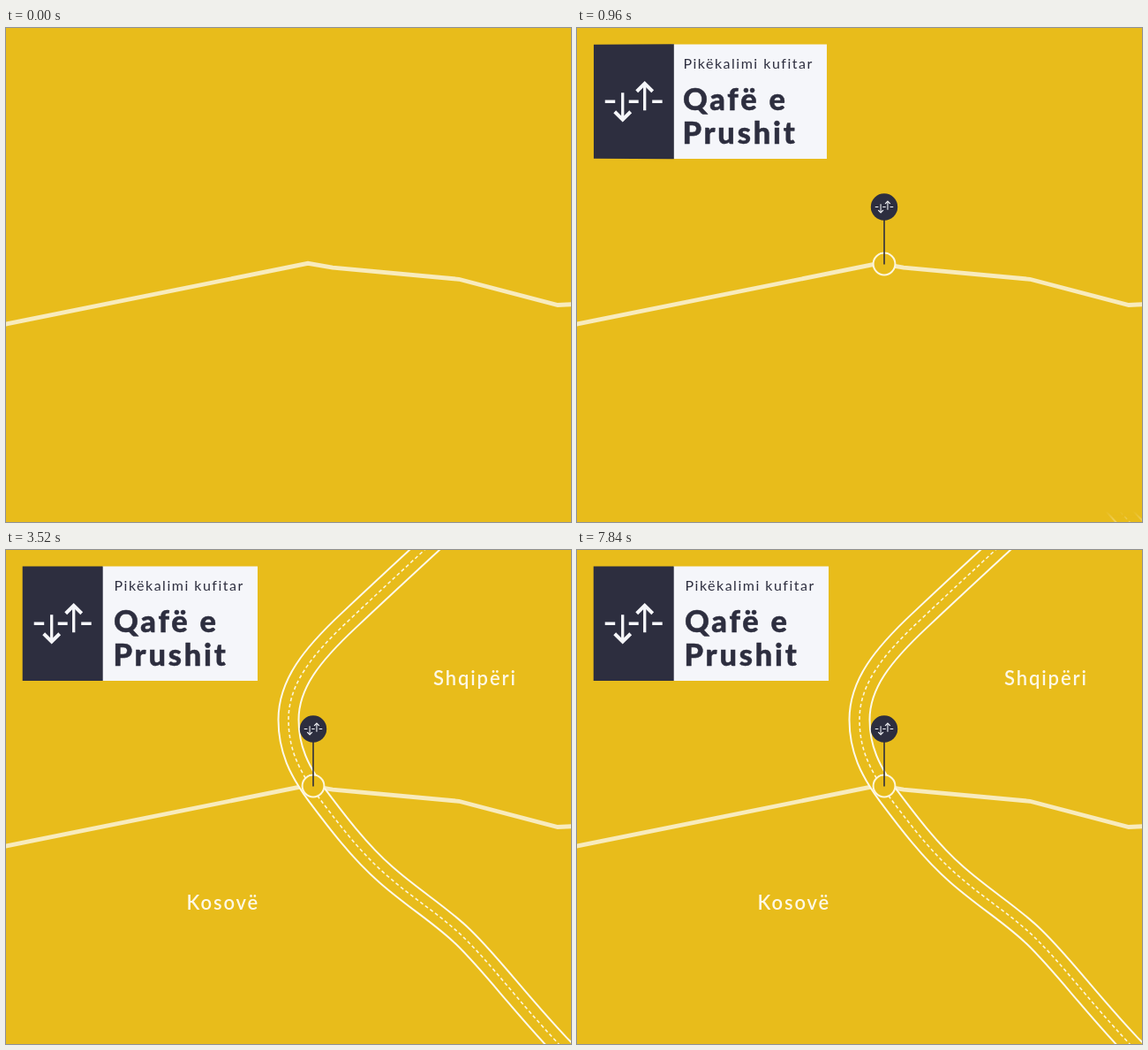
An HTML page for the animation above (8 s loop, 640x559 px).

```html
<!DOCTYPE html>
<html lang="sq">
<head>
<meta charset="utf-8">
<title>Pikëkalimi kufitar</title>
<style>
  html, body { margin: 0; width: 100%; height: 100%; overflow: hidden; background: #e8bc1b; }
  svg { display: block; width: 100%; height: 100%; }
  text { font-family: Lato, "Open Sans", sans-serif; }
  .small { font-size: 16px; letter-spacing: 1.5px; fill: #2d2e3f; }
  .title { font-size: 34.4px; font-weight: 800; letter-spacing: 2.8px; fill: #2d2e3f; stroke: #2d2e3f; stroke-width: .5px; }
  .label { font-size: 22px; font-weight: 600; letter-spacing: 1.9px; fill: #fdf8e6; }
</style>
</head>
<body>
<svg viewBox="0 0 640 559">
  <defs>
    <!-- crossing symbol, centred on 0,0 -->
    <g id="icon" fill="none" stroke="#f5f6fa" stroke-width="3.3">
      <path d="M-32.5 0h11.5M-5.5 0h11M21 0h11.5M-12.5 -10V19M12.5 10V-19"/>
      <path stroke-width="4" d="M-21.5 11.5l9 9l9 -9M3.5 -11.5l9 -9l9 9"/>
    </g>
    <path id="road" d="M487 -12C450 22 423 47 389 79C346 119 320 152 320 192C320 225 332 250 352 277C373 305 400 341 430 367C463 396 491 412 518 438C551 470 578 508 627 560l8 8"/>
    <linearGradient id="fade" gradientUnits="userSpaceOnUse" x1="0" x2="0" y1="559" y2="595">
      <stop offset="0" stop-color="#fff" stop-opacity="0"/>
      <stop offset="1" stop-color="#fff"/>
    </linearGradient>
    <mask id="wipe" maskUnits="userSpaceOnUse" x="0" y="0" width="640" height="559">
      <rect width="640" height="559" fill="url(#fade)"/>
    </mask>
    <clipPath id="right"><rect x="64" y="0" width="576" height="200"/></clipPath>
  </defs>

  <rect width="640" height="559" fill="#e8bc1b"/>
  <path d="M-5 336L342 266.3L370 271.2L513 284.3L625 313.5L645 312.5" fill="none" stroke="#f8ebbc" stroke-width="4.8"/>

  <g mask="url(#wipe)" fill="none">
    <use href="#road" stroke="#fdf9ea" stroke-width="25"/>
    <use href="#road" stroke="#e8bc1b" stroke-width="21"/>
    <use href="#road" stroke="#fdf6dc" stroke-width="1.6" stroke-dasharray="4 3"/>
  </g>

  <circle id="ring" cx="348" cy="267" r="12.4" fill="#e8bc1b" stroke="#fdf6dc" stroke-width="2"/>
  <path id="stem" stroke="#2d2e3f" stroke-width="1.6"/>
  <g id="pin" transform="translate(348 202.5)">
    <circle r="15.2" fill="#2d2e3f"/>
    <use href="#icon" transform="scale(.315)"/>
  </g>

  <g id="labels">
    <text class="label" x="484" y="152.5">Shqipëri</text>
    <text class="label" x="204.5" y="407">Kosovë</text>
  </g>

  <g clip-path="url(#right)">
    <g id="card">
      <rect x="109" y="18.5" width="176" height="129.5" fill="#f5f6fa"/>
      <text class="small" x="122.5" y="46.3">Pikëkalimi kufitar</text>
      <text class="title" x="122" y="92.5">Qafë e</text>
      <text class="title" x="121.5" y="131.3">Prushit</text>
    </g>
  </g>
  <g id="panel">
    <polygon id="face" fill="#2d2e3f"/>
    <use id="mark" href="#icon"/>
  </g>
</svg>
<script>
  const LOOP = 8000, STEP = 80;
  const el = id => document.getElementById(id);
  const set = (id, name, value) => el(id).setAttribute(name, value);

  const part = (t, from, to) => Math.min(1, Math.max(0, (t - from) / (to - from)));
  const easeOut = p => 1 - (1 - p) ** 2;
  const easeInOut = p => p < .5 ? 2 * p * p : 1 - 2 * (1 - p) ** 2;
  const easeSine = p => .5 - .5 * Math.cos(Math.PI * p);

  // Dark panel turning about its vertical centre line, in perspective
  function drawPanel(t) {
    const cx = 64.2, cy = 83.25, halfW = 45.5, halfH = 64.75, depth = 640;
    const angle = (1 - easeOut(part(t, 80, 1160))) * Math.PI / 2;
    const corner = (sx, sy) => {
      const zoom = depth / (depth - sx * halfW * Math.sin(angle));
      return [cx + sx * halfW * Math.cos(angle) * zoom, cy + sy * halfH * zoom];
    };
    set('face', 'points', [corner(-1, -1), corner(1, -1), corner(1, 1), corner(-1, 1)].join(' '));
    set('mark', 'transform', `translate(${cx} ${cy}) scale(${Math.cos(angle)} 1)`);
    set('panel', 'opacity', part(t, 80, 300));
  }

  function draw(t) {
    drawPanel(t);

    const slide = easeInOut(part(t, 450, 1002));
    set('card', 'transform', `translate(${-176 * (1 - slide)} 0)`);
    set('card', 'opacity', slide > 0 ? 1 : 0);

    const show = part(t, 520, 830);
    set('ring', 'opacity', show);
    set('pin', 'opacity', show);
    set('stem', 'd', `M348 267.5V${267.5 - 51 * easeInOut(part(t, 560, 880))}`);

    const tip = 559 - 604 * easeSine(part(t, 880, 1760));
    set('fade', 'y1', tip);
    set('fade', 'y2', tip + 36);

    set('labels', 'opacity', easeSine(part(t, 1960, 2600)));
  }

  const start = performance.now();
  function tick() {
    const t = (performance.now() - start) % LOOP;
    draw(Math.floor(t / STEP) * STEP);
    requestAnimationFrame(tick);
  }
  tick();
</script>
</body>
</html>
```
